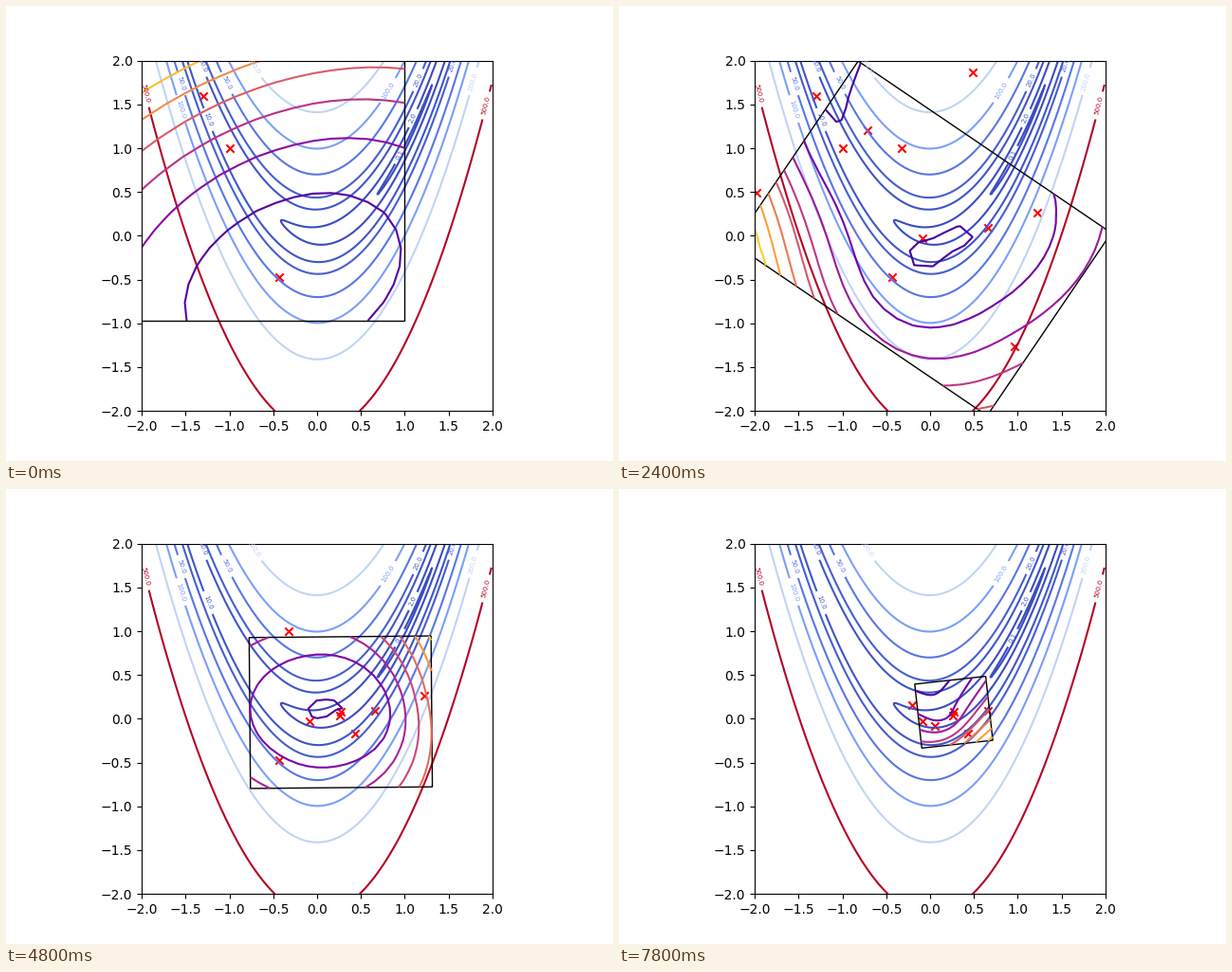
Recreate the animation shown at these times as a matplotlib script. Size 640 by 480 pixels, loop 8000 ms.

```python
import numpy as np
import matplotlib.pyplot as plt
from matplotlib.animation import FuncAnimation
from matplotlib.patches import Polygon

INTERVAL, FRAMES, STEP_MS = 100, 80, 300

# Evaluated points: x, y, first step, last step on show
SAMPLES = np.array([
    (-1.30, 1.59, -1, 8), (-1.00, 1.00, -1, 12), (-0.43, -0.47, 0, 20),
    (-0.33, 1.00, 1, 16), (-0.71, 1.205, 2, 12), (-1.98, 0.49, 3, 8),
    (0.66, 0.09, 4, 26), (0.49, 1.87, 5, 9), (-0.085, -0.03, 6, 26),
    (0.96, -1.26, 7, 15), (1.22, 0.26, 8, 16), (0.27, 0.075, 9, 26),
    (-1.35, 0.70, 10, 12), (1.595, -0.44, 11, 12), (-0.92, 0.04, 12, 14),
    (0.43, -0.17, 14, 26), (0.255, 0.04, 16, 26), (-0.84, 0.23, 17, 19),
    (0.05, -0.08, 18, 26), (0.64, 0.74, 20, 23), (-0.24, -0.08, 22, 24),
    (-0.21, 0.16, 26, 26)])

# Trust region poses: step, angle in degrees, width, height
POSES = np.array([
    (0, 0, 4.0, 3.94), (6, -34.7, 3.78, 2.86), (11, -33.4, 3.10, 2.09),
    (14, 3.2, 2.71, 1.94), (18, -2.2, 1.59, 1.53), (22, 24.9, 1.06, 0.93),
    (26, 6.3, 0.815, 0.735)])
CORNERS = np.array([(-1, -1), (1, -1), (1, 1), (-1, 1)])
GRID = np.stack(np.meshgrid(*[np.linspace(-1, 1, 20)] * 2), axis=-1)


def rosenbrock(p):
    x, y = p[..., 0], p[..., 1]
    return (1 - x)**2 + 100 * (y - x**2)**2


def bowl(p):
    """Quadratic model used while there are few points."""
    dx, dy = p[..., 0] + 0.275, p[..., 1] + 0.5
    return 1.4 + 0.588 * (0.737 * dx**2 - 0.568 * dx * dy + 1.151 * dy**2)


def cubic_rbf(nodes):
    """Cubic radial interpolant of the function with a linear tail."""
    def distance_cubed(p):
        return np.linalg.norm(p[..., None, :] - nodes, axis=-1)**3

    n = len(nodes)
    tail = np.column_stack([np.ones(n), nodes])
    system = np.block([[distance_cubed(nodes), tail], [tail.T, np.zeros((3, 3))]])
    weights = np.linalg.solve(system, np.append(rosenbrock(nodes), np.zeros(3)))
    return lambda p: distance_cubed(p) @ weights[:n] + weights[n] + p @ weights[n + 1:]


def region(step, center):
    """Map from the unit square to the trust region of a step."""
    keys = POSES[:, 0]
    angle = np.radians(np.interp(step, keys, POSES[:, 1]))
    half = np.exp([np.interp(step, keys, np.log(POSES[:, i] / 2)) for i in (2, 3)])
    c, s = np.cos(angle), np.sin(angle)
    return lambda p: p * half @ np.array([[c, s], [-s, c]]) + center


fig, ax = plt.subplots(figsize=(6.4, 4.8), dpi=100)
ax.set(xlim=(-2, 2), ylim=(-2, 2), aspect="equal")
ax.apply_aspect()

axis = np.arange(-2, 2, 0.01)
X, Y = np.meshgrid(axis, axis)
valley = ax.contour(X, Y, rosenbrock(np.stack([X, Y], axis=-1)), cmap="coolwarm",
                    levels=[0.1, 2, 10, 20, 50, 100, 200, 500])
label_spots = [(-1.95, 1.63), (1.92, 1.49), (-0.71, 1.95), (1.76, 1.77), (-1.55, 1.45),
               (0.81, 1.66), (-1.54, 1.74), (-1.02, 1.75), (1.15, 1.78), (1.54, 1.95),
               (-1.30, 1.95), (-1.245, 1.325), (1.09, 1.345), (0.94, 0.925)]
ax.clabel(valley, fmt="%1.1f", fontsize=5, manual=label_spots)

markers = ax.scatter([], [], marker="x", color="red", zorder=1)
border = ax.add_patch(Polygon(CORNERS, fill=False, lw=1, zorder=2))
drawn = []


def update(frame):
    step = frame * INTERVAL // STEP_MS
    shown = SAMPLES[(SAMPLES[:, 2] <= step) & (step <= SAMPLES[:, 3])]
    markers.set_offsets(shown[:, :2])

    # The newest point is not part of the model yet
    nodes = shown[shown[:, 2] < step, :2]
    place = region(step, nodes[np.argmin(rosenbrock(nodes))])
    border.set_xy(place(CORNERS))

    points = place(GRID)
    model = cubic_rbf(nodes) if len(nodes) > 4 else bowl
    z = model(points)
    # Only the part inside the bounds sets the range of levels
    inside = z[np.all(np.abs(points) <= 2, axis=-1)]
    z = np.clip(z, inside.min(), inside.max())
    while drawn:
        drawn.pop().remove()
    drawn.append(ax.contour(points[..., 0], points[..., 1], z, cmap="plasma"))
    return markers, border, drawn[0]


anim = FuncAnimation(fig, update, frames=FRAMES, interval=INTERVAL, repeat=True, repeat_delay=0)
plt.show()
```
